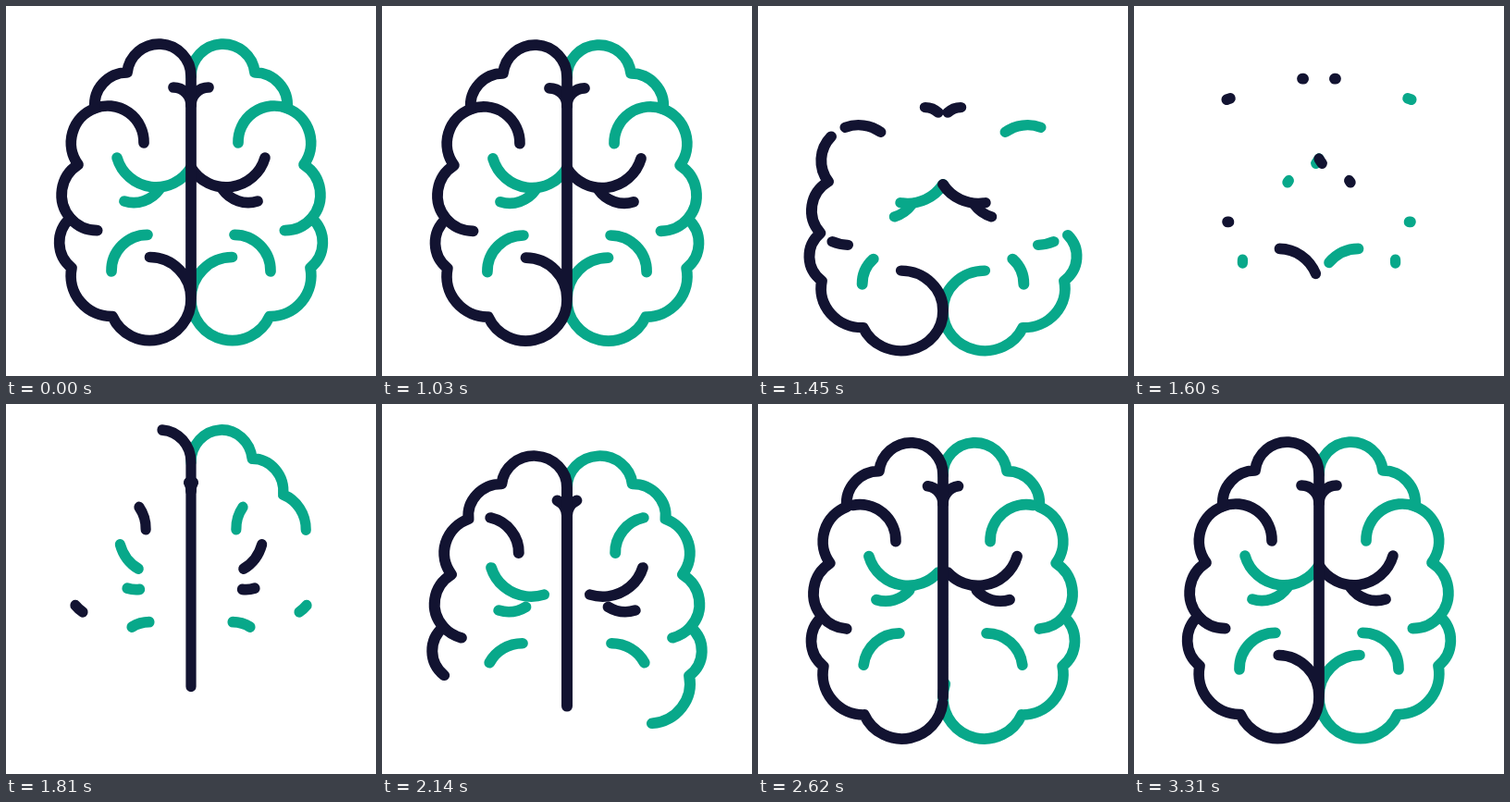
Animation of 400x400 px, one loop 3370 ms. Source, as an HTML page:

```html
<!DOCTYPE html>
<html lang="en">
<head>
<meta charset="utf-8">
<title>Brain</title>
<style>
  html, body { margin: 0; width: 100%; height: 100%; overflow: hidden; background: #fff; }
  svg { display: block; width: 100%; height: 100%; }
  path { fill: none; stroke-width: 11.7; stroke-linecap: round; stroke-linejoin: round; }
</style>
</head>
<body>
<svg viewBox="0 0 400 400"><g id="brain"></g></svg>
<script>
const NS = 'http://www.w3.org/2000/svg';
const DARK = '#121331', TEAL = '#08a88a';
const LOOP = 3370, START = 1000, SWITCH = 1617, END = 3335;

// All curves are drawn for the left half; the right half is mirrored.
const OUTLINE = 'A34.6 34.6 0 0 0 131 72A35 35 0 0 0 96 110.6A40 40 0 0 0 78 171.5' +
  'A38.6 38.6 0 0 0 69.5 229.3A35 35 0 0 0 71 283A44 44 0 0 0 115 335.5' +
  'A44.5 44.5 0 0 0 200 316.5A44.7 44.7 0 0 0 155.5 271.5';
const UPPER_FOLD = 'M149 148A39 39 0 0 0 96 110.6';
const SIDE_FOLD = 'M69.5 229.3A38.6 38.6 0 0 0 98.7 242.6';
const SWOOSH = 'M120 164A44 44 0 0 0 200 174.5';
const BRANCH = 'M128 211A34 34 0 0 0 166 198';
const LOWER = 'M153 247.3A39 39 0 0 0 114 287';
const FORK = 'M200 107A19 19 0 0 0 181 88';

const brain = document.getElementById('brain');
const paths = [];

function add(color, mirrored, ...shapes) {
  for (const d of shapes) {
    const p = document.createElementNS(NS, 'path');
    p.setAttribute('d', d);
    p.setAttribute('stroke', color);
    p.setAttribute('pathLength', 1);
    if (mirrored) p.setAttribute('transform', 'matrix(-1 0 0 1 400 0)');
    brain.append(p);
    paths.push(p);
  }
}

add(TEAL, false, SWOOSH, BRANCH, LOWER);
add(TEAL, true, 'M200 76' + OUTLINE, UPPER_FOLD, SIDE_FOLD, LOWER);
add(DARK, true, SWOOSH, BRANCH, FORK);
add(DARK, false, UPPER_FOLD, SIDE_FOLD, FORK, 'M200 316.5V76' + OUTLINE);

// time, vertical shift, horizontal scale, vertical scale
const POSES = [
  [1000, 0, 1, 1],
  [1310, 31, 1.044, 0.942],
  [1700, -16.4, 0.946, 1.012],
  [2130, 12.3, 1.024, 0.983],
  [2700, 0, 1, 1]
];

function poseAt(t) {
  const i = POSES.findIndex(p => t < p[0]);
  if (i < 1) return [0, 1, 1];
  const a = POSES[i - 1], b = POSES[i];
  const k = (1 - Math.cos(Math.PI * (t - a[0]) / (b[0] - a[0]))) / 2;
  return [1, 2, 3].map(n => a[n] + (b[n] - a[n]) * k);
}

// Visible part of every curve: erased from its start, then drawn again.
function trimAt(t) {
  if (t < START || t >= END) return [0, 1];
  if (t < SWITCH) return [((t - START) / (SWITCH - START)) ** 2.32, 1];
  const left = 1 - (t - SWITCH) / (END - SWITCH);
  return [0, 1 - 0.19 * left ** 1.25 - 0.81 * left ** 4];
}

function render(t) {
  const [dy, sx, sy] = poseAt(t);
  brain.setAttribute('transform',
    `translate(200 ${200 + dy}) scale(${sx} ${sy}) translate(-200 -200)`);
  const [from, to] = trimAt(t);
  const size = to - from;
  brain.style.visibility = size < 0.003 ? 'hidden' : 'visible';
  for (const p of paths) {
    p.style.strokeDasharray = size > 0.9995 ? 'none' : `${size.toFixed(5)} 3`;
    p.style.strokeDashoffset = (-from).toFixed(5);
  }
}

const origin = performance.now();
function tick() {
  render((performance.now() - origin) % LOOP);
  requestAnimationFrame(tick);
}
tick();
</script>
</body>
</html>
```
